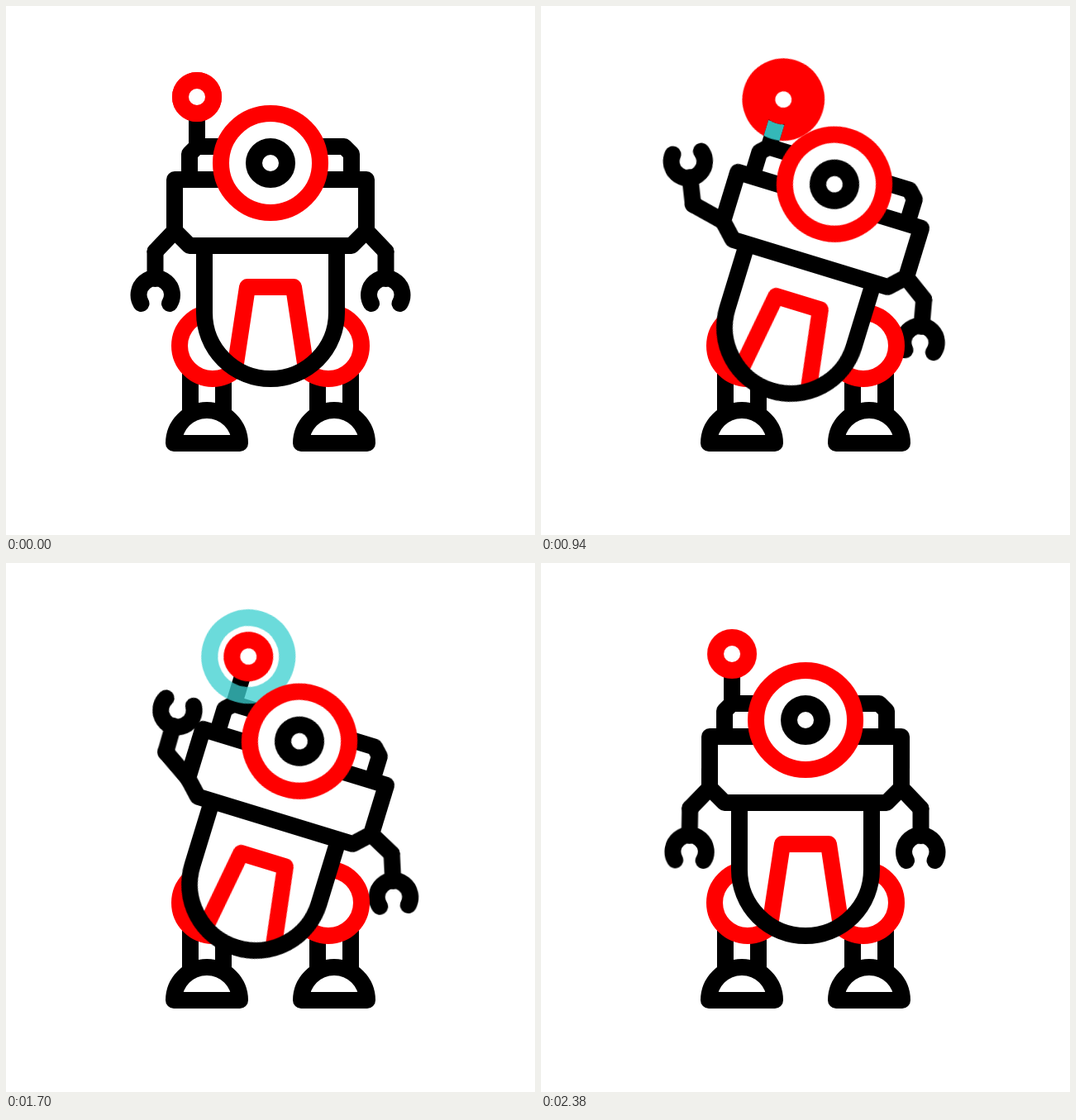
Animation of 640 by 640 pixels, one loop 2.4 s. Source, as an HTML page without scripts:

```html
<!DOCTYPE html>
<html lang="en">
<head>
<meta charset="utf-8">
<title>Waving robot</title>
<style>
  :root { --red: #f00; --teal: #3bcfcf; }
  html, body { margin: 0; width: 100%; height: 100%; overflow: hidden; background: #fff; }
  svg { display: block; width: 100%; height: 100%; }

  .line { fill: none; stroke: #000; stroke-width: 20; stroke-linejoin: round; }
  .solid { fill: #fff; }
  .red { stroke: var(--red); }
  .round { stroke-linecap: round; }

  .lean, .arm, .forearm, .swing { animation: 2400ms infinite; }
  .lean { transform-origin: 251.5px 320px; animation-name: lean; }
  .arm, .swing { transform-origin: 204px 272px; }
  .arm { animation-name: raise; }
  .forearm { transform-origin: 180.5px 297px; animation-name: bend; }
  .swing { animation-name: swing; animation-timing-function: ease-in-out; }

  @keyframes lean {
    0% { transform: rotate(0deg); animation-timing-function: cubic-bezier(.55, 0, .45, 1); }
    22.2% { transform: rotate(17deg); }
    78.5% { transform: rotate(17deg); animation-timing-function: cubic-bezier(.55, 0, .45, 1); }
    100% { transform: rotate(0deg); }
  }
  @keyframes raise {
    0% { transform: rotate(0deg) translate(0, 0); animation-timing-function: ease-in; }
    11.67% { transform: rotate(43deg) translate(-1px, 1px); animation-timing-function: ease-out; }
    25% { transform: rotate(76deg) translate(-5px, 5px); animation-timing-function: ease-in-out; }
    35% { transform: rotate(53deg) translate(-5px, 5px); animation-timing-function: cubic-bezier(.3, .2, .6, 1); }
    59% { transform: rotate(85deg) translate(-5px, 5px); animation-timing-function: ease-in-out; }
    75% { transform: rotate(78deg) translate(-5px, 5px); animation-timing-function: ease-in; }
    81.67% { transform: rotate(72deg) translate(-5px, 5px); animation-timing-function: linear; }
    90% { transform: rotate(43deg) translate(-1px, 1px); animation-timing-function: ease-out; }
    100% { transform: rotate(0deg) translate(0, 0); }
  }
  @keyframes bend {
    0% { transform: rotate(0deg) scale(1); animation-timing-function: ease-in; }
    11.67% { transform: rotate(51deg) scale(.86); animation-timing-function: ease-out; }
    25% { transform: rotate(105deg) scale(1); animation-timing-function: ease-in-out; }
    38% { transform: rotate(98deg) scale(1); }
    59% { transform: rotate(99deg) scale(1); }
    75% { transform: rotate(100deg) scale(1); animation-timing-function: ease-in; }
    81.67% { transform: rotate(89deg) scale(.87); animation-timing-function: linear; }
    90% { transform: rotate(51deg) scale(.86); animation-timing-function: ease-out; }
    100% { transform: rotate(0deg) scale(1); }
  }
  @keyframes swing {
    0%, 100% { transform: rotate(0deg); }
    24%, 75% { transform: rotate(20.5deg); }
    50% { transform: rotate(7.5deg); }
  }

  /* Signal rings: red while fresh, teal once they fade */
  .wave circle {
    fill: none; stroke-width: 20; stroke: transparent;
    animation: 2400ms var(--delay, 0ms) infinite;
    animation-name: grow, var(--tint), var(--fade, fade);
    animation-timing-function: linear, step-end, linear;
  }
  .fresh { --tint: fresh; --fade: none; }
  .stem { --tint: stem; }
  .halo { --tint: halo; }
  .second { --delay: -1745.45ms; }
  .third { --delay: -1090.91ms; }

  @keyframes grow { 0% { r: 20px; } 36.364%, 100% { r: 80px; } }
  @keyframes fade { 0%, 8.33% { opacity: 1; } 41.67%, 100% { opacity: 0; } }
  @keyframes fresh {
    0% { stroke: var(--red); fill: var(--red); }
    12.1% { stroke: var(--red); fill: transparent; }
    14.6%, 100% { stroke: transparent; fill: transparent; }
  }
  @keyframes stem { 0% { stroke: var(--red); } 8.4% { stroke: var(--teal); } 14.6%, 100% { stroke: transparent; } }
  @keyframes halo { 0% { stroke: transparent; } 14.6% { stroke: var(--teal); } 38.5%, 100% { stroke: transparent; } }
</style>
</head>
<body>
<svg viewBox="0 0 640 640">
  <defs>
    <path id="upper" class="line round" d="M210 266L180.5 297"/>
    <g id="lower" class="line round">
      <path d="M180.5 297V330"/>
      <path d="M163.5 360A20.2 20.2 0 1 1 198 360"/>
    </g>
    <g id="leg" class="line">
      <path d="M223 430V500M263 430V500"/>
      <path class="solid" d="M203 529a40 40 0 0 1 80 0z"/>
      <circle class="solid red" cx="250" cy="411" r="40"/>
    </g>
    <clipPath id="stemArea"><path d="M221 139h20v21h30v20h-50z"/></clipPath>
  </defs>

  <g class="lean">
    <g class="wave fresh">
      <circle cx="231" cy="110" r="20"/>
      <circle class="second" cx="231" cy="110" r="20"/>
      <circle class="third" cx="231" cy="110" r="20"/>
    </g>
    <g class="arm">
      <use href="#upper"/>
      <g class="forearm"><use href="#lower"/></g>
    </g>
    <g transform="matrix(-1 0 0 1 640 0)">
      <g class="swing"><use href="#upper"/><use href="#lower"/></g>
    </g>
  </g>

  <use href="#leg"/>
  <use href="#leg" transform="matrix(-1 0 0 1 640 0)"/>

  <g class="lean">
    <g class="line">
      <path d="M231 130V172"/>
      <path d="M222 205V179L231 170H409L418 179V205"/>
      <path class="solid" stroke="none" d="M240 290V371a80 80 0 0 0 160 0V290z"/>
      <path class="red" d="M277 439L292 340H348L363 439"/>
      <path d="M240 290V371a80 80 0 0 0 160 0V290"/>
      <path class="solid" d="M204 210H436V272L418 290H222L204 272z"/>
    </g>
    <g class="wave stem" clip-path="url(#stemArea)">
      <circle cx="231" cy="110" r="20"/>
      <circle class="second" cx="231" cy="110" r="20"/>
      <circle class="third" cx="231" cy="110" r="20"/>
    </g>
    <g class="wave halo">
      <circle cx="231" cy="110" r="20"/>
      <circle class="second" cx="231" cy="110" r="20"/>
      <circle class="third" cx="231" cy="110" r="20"/>
    </g>
    <g class="line">
      <circle class="solid red" cx="231" cy="110" r="20"/>
      <circle class="solid red" cx="320" cy="190" r="60"/>
      <circle cx="320" cy="190" r="20"/>
    </g>
  </g>
</svg>
</body>
</html>
```
